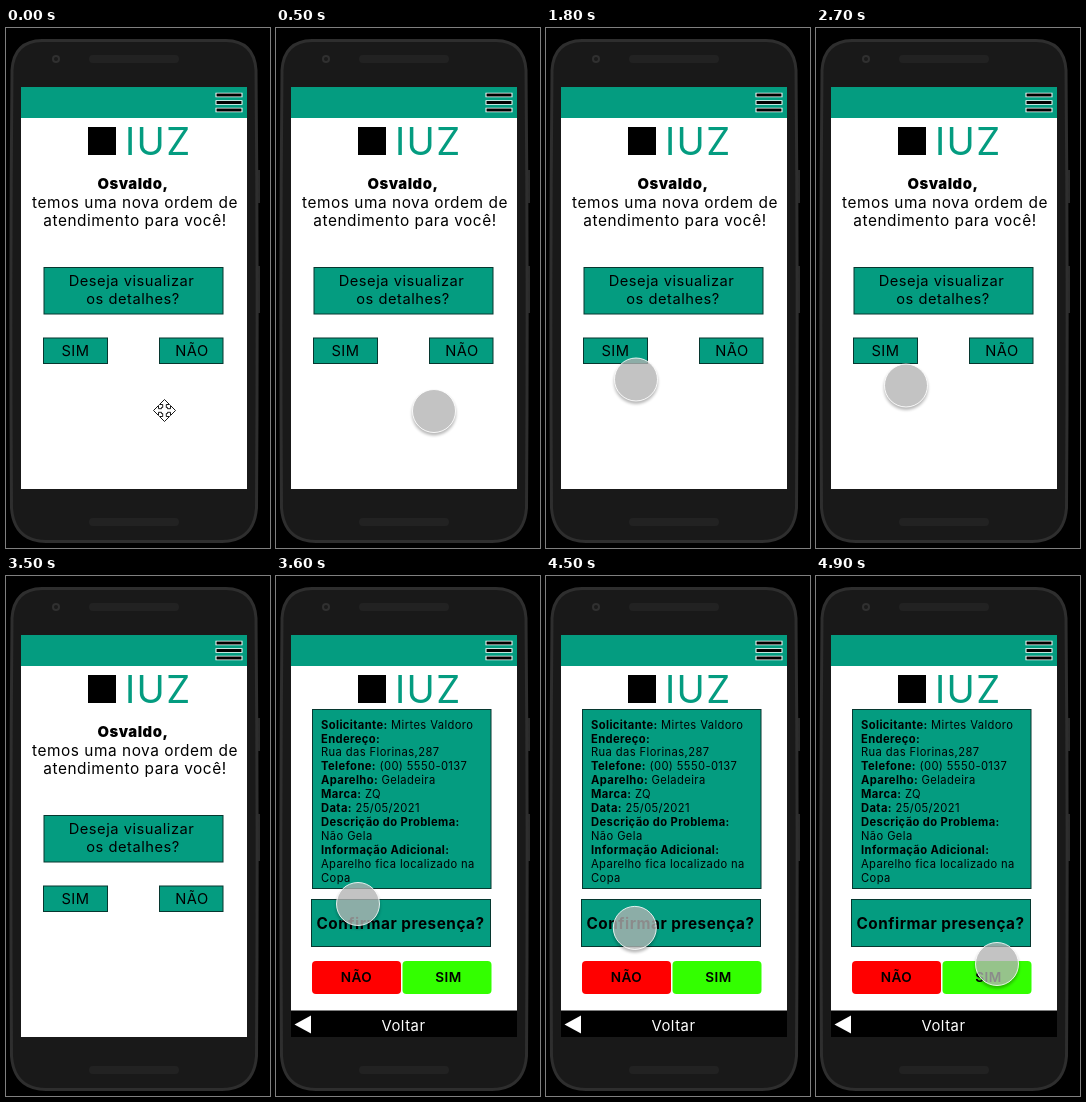
An HTML page for the animation above (5 s loop, 264 px wide and 520 px high).

```html
<!DOCTYPE html>
<html lang="pt-BR">
<head>
<meta charset="utf-8">
<style>
  html, body { margin: 0; width: 264px; height: 520px; overflow: hidden; background: #000; }
  svg { display: block; font: 15px Inter, sans-serif; }
  text { letter-spacing: .035em; }
  .mid { text-anchor: middle; }
  .green { fill: #049c80; }
  .box { fill: #049c80; stroke: #06372f; }
  .bold { font-weight: 700; }
  .bar { fill: #222; }
</style>
</head>
<body>
<svg width="264" height="520" viewBox="0 0 264 520">
  <defs>
    <filter id="soft" x="-50%" y="-50%" width="200%" height="200%"><feGaussianBlur stdDeviation="1.8"/></filter>
    <mask id="outside" maskUnits="userSpaceOnUse" x="-40" y="-40" width="80" height="80">
      <rect x="-40" y="-40" width="80" height="80" fill="#fff"/><circle r="21.5"/>
    </mask>
  </defs>

  <!-- phone -->
  <path d="M251 142h3v33h-3zM251 238h3v47h-3z" fill="#2a2a2a"/>
  <path d="M36 12.5H220Q248 13 250 42Q252 260 250.5 480Q248 513 216 513.5H40Q8 513 5.5 480Q4 260 6 42Q8 13 36 12.5Z"
        fill="#191919" stroke="#2e2e2e" stroke-width="3"/>
  <rect class="bar" x="83" y="27" width="90" height="8" rx="4"/>
  <rect class="bar" x="83" y="490" width="90" height="8" rx="4"/>
  <circle cx="50" cy="31" r="4" fill="#303030"/><circle cx="50" cy="31" r="2" fill="#1b1b1b"/>

  <!-- shared screen parts -->
  <rect x="15" y="59" width="226" height="402" fill="#fff"/>
  <rect class="green" x="15" y="59" width="226" height="31"/>
  <g fill="none">
    <path d="M209.5 67h27M209.5 74.5h27M209.5 82h27" stroke="#fff" stroke-width="4.6"/>
    <path d="M210.5 67h25M210.5 74.5h25M210.5 82h25" stroke="#000" stroke-width="3"/>
  </g>
  <rect x="82" y="99" width="28" height="28"/>
  <text class="green" x="119" y="126.5" font-size="38">IUZ</text>

  <g id="order">
    <text class="mid" x="127" y="161" font-size="14.8" font-weight="900">Osvaldo,</text>
    <g class="mid" font-size="15.4">
      <text x="129" y="179.7">temos uma nova ordem de</text>
      <text x="129" y="197.7">atendimento para você!</text>
    </g>
    <rect class="box" x="38" y="239.5" width="179" height="46.5"/>
    <rect class="box" x="37.5" y="310" width="64" height="25.5"/>
    <rect class="box" x="153.5" y="310" width="63.5" height="25.5"/>
    <g class="mid" font-size="14.7">
      <text x="125.5" y="258.3">Deseja visualizar</text>
      <text x="127" y="276.3">os detalhes?</text>
      <text x="69.5" y="328.2">SIM</text>
      <text x="186" y="328.2">NÃO</text>
    </g>
  </g>

  <g id="details">
    <rect class="box" x="36.5" y="133.5" width="178.5" height="179"/>
    <g id="lines" font-size="11.2"></g>
    <rect class="box" x="35.5" y="323.5" width="179" height="47"/>
    <rect x="36" y="385" width="89" height="33" rx="4" fill="#f00"/>
    <rect x="126.5" y="385" width="89" height="33" rx="4" fill="#3f0"/>
    <g class="mid bold">
      <text x="124.5" y="352.8" font-size="15.3">Confirmar presença?</text>
      <text x="80.5" y="405.8" font-size="13.6" font-weight="600">NÃO</text>
      <text x="172.5" y="405.8" font-size="13.6" font-weight="600">SIM</text>
    </g>
    <rect x="15" y="434.5" width="226" height="26.5"/>
    <path d="M18.5 448.5L35 439.5V457.5Z" fill="#fff"/>
    <text class="mid" x="127.5" y="454.7" font-size="14.8" fill="#fff">Voltar</text>
  </g>

  <path id="cursor" transform="translate(158.5 382.5)" fill="#fff" stroke="#000" stroke-width=".9"
        d="M0 -11L5 -6H1.8V-3H3V-1.8H6V-5L11 0L6 5V1.8H3V3H1.8V6H5L0 11L-5 6H-1.8V3H-3V1.8H-6V5L-11 0L-6 -5V-1.8H-3V-3H-1.8V-6H-5Z"/>
  <g id="touch">
    <g mask="url(#outside)"><circle cy="2.5" r="22" opacity=".28" filter="url(#soft)"/></g>
    <circle r="21.5" fill="#b2b2b2" fill-opacity=".78" stroke="#fff" stroke-opacity=".85"/>
  </g>
</svg>
<script>
const $ = id => document.getElementById(id);

const lines = [
  ['Solicitante:', 'Mirtes Valdoro'], ['Endereço:'], ['', 'Rua das Florinas,287'],
  ['Telefone:', '(00) 5550-0137'], ['Aparelho:', 'Geladeira'], ['Marca:', 'ZQ'],
  ['Data:', '25/05/2021'], ['Descrição do Problema:'], ['', 'Não Gela'],
  ['Informação Adicional:'], ['', 'Aparelho fica localizado na'], ['', 'Copa']
];
$('lines').innerHTML = lines.map(([label, value = ''], i) =>
  `<text x="45" y="${152.6 + i * 13.9}"><tspan class="bold">${label}</tspan>${label && ' '}${value}</text>`).join('');

// touch point: time, x, y
const path = [
  [200, 158, 383], [600, 158, 383], [1000, 107, 362.5], [1200, 87, 343], [1300, 87, 345],
  [1800, 90, 351.5], [2600, 90, 351.5], [2700, 90, 357.5], [3300, 86, 352],
  [3600, 82, 328], [3900, 82, 328], [4400, 71, 345], [4800, 185, 389], [4900, 181, 388]
];
const ease = p => p * p * (3 - 2 * p);

function touchAt(t) {
  const i = path.findIndex(k => k[0] > t);
  if (i < 0) return path[path.length - 1].slice(1);
  if (i === 0) return path[0].slice(1);
  const [t0, x0, y0] = path[i - 1], [t1, x1, y1] = path[i];
  const p = ease((t - t0) / (t1 - t0));
  return [x0 + (x1 - x0) * p, y0 + (y1 - y0) * p];
}

const show = (id, on) => $(id).style.display = on ? '' : 'none';

function draw(now) {
  const t = Math.floor(now % 5000 / 100) * 100;
  const second = t >= 3600;
  show('order', !second);
  show('details', second);
  show('cursor', t < 200);
  show('touch', t >= 200 && (t < 3400 || second));
  $('touch').setAttribute('transform', `translate(${touchAt(t)})`);
}

const start = performance.now();
function tick() {
  draw(performance.now() - start);
  requestAnimationFrame(tick);
}
tick();
</script>
</body>
</html>
```
